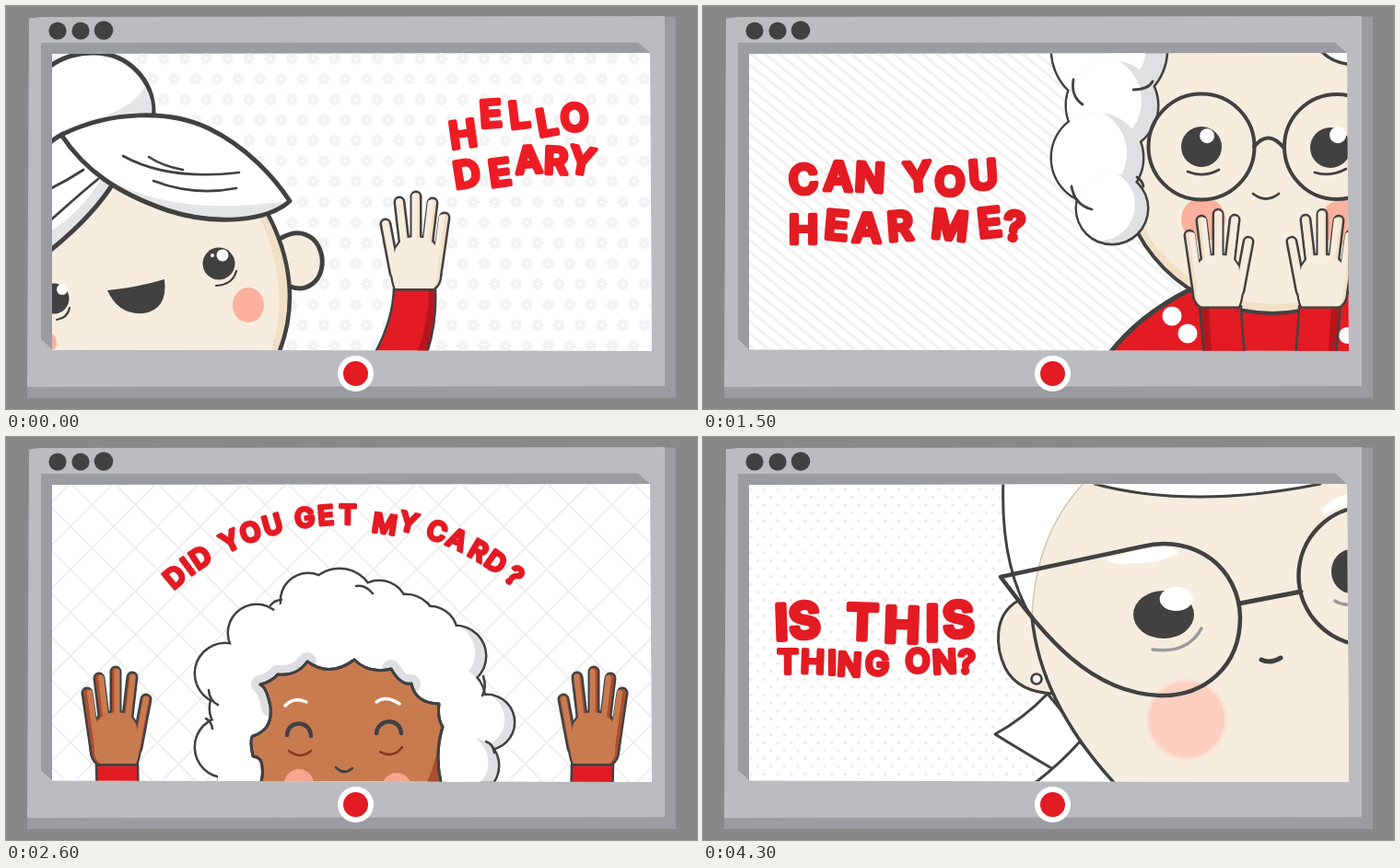
Animation of 750 by 438 pixels, one loop 4.4 s. Source, as an HTML page with a canvas:

```html
<!DOCTYPE html>
<html lang="en">
<head>
<meta charset="utf-8">
<title>Video call</title>
<style>
html, body { margin: 0; width: 100%; height: 100%; overflow: hidden; background: #888; }
canvas { display: block; width: 750px; height: 438px; }
</style>
</head>
<body>
<canvas id="stage" width="750" height="438"></canvas>
<script>
const ctx = document.getElementById('stage').getContext('2d');
const INK = '#414142', RED = '#e31b23', DEEP = '#b5161c', SKIN = '#f7eddf', SAND = '#f1e0c6';
const BROWN = '#c97b50', RUST = '#a94f30', BLUSH = '#fbb19d', GREY = '#e4e5e7';
const STEP = 100, SCENE = 1100, LOOP = 4400;
const SCREEN = new Path2D('M50 52L699 51L701 375L50 373.5Z');

function fill(d, color) {
  ctx.fillStyle = color;
  ctx.fill(new Path2D(d));
}

function line(d, width = 4, color = INK) {
  ctx.strokeStyle = color;
  ctx.lineWidth = width;
  ctx.stroke(new Path2D(d));
}

function shape(d, color, width) {
  fill(d, color);
  line(d, width);
}

function oval(x, y, rx, color, ry = rx) {
  ctx.fillStyle = color;
  ctx.beginPath();
  ctx.ellipse(x, y, rx, ry, 0, 0, Math.PI * 2);
  ctx.fill();
}

function ring(x, y, r, width = 4) {
  ctx.strokeStyle = INK;
  ctx.lineWidth = width;
  ctx.beginPath();
  ctx.arc(x, y, r, 0, Math.PI * 2);
  ctx.stroke();
}

function at(x, y, draw) {
  ctx.save();
  ctx.translate(x, y);
  draw();
  ctx.restore();
}

// spots: x, y, degrees per letter; the second pose shakes each letter a little
function letters(text, spots, size, color, shaken) {
  ctx.font = `600 ${size}px Inter, "Open Sans", sans-serif`;
  ctx.textAlign = 'center';
  ctx.fillStyle = ctx.strokeStyle = color;
  ctx.lineWidth = size * 0.11;
  [...text].forEach((ch, i) => {
    const [x, y, deg] = spots.slice(i * 3, i * 3 + 3);
    const shake = shaken ? Math.sin(i * 2.4 + 1) : 0;
    ctx.save();
    ctx.translate(x, y - shake);
    ctx.rotate((deg + shake * 2) * Math.PI / 180);
    ctx.fillText(ch, 0, size * 0.364);
    ctx.strokeText(ch, 0, size * 0.364);
    ctx.restore();
  });
}

const FINGERS = new Path2D('M-31 28L-22 90M-18 12L-12 62M0 5L0 62M18 11L12 62M33 35L23 88');
const PALM = new Path2D('M-25 62L-14 51L0 49L14 51L22 62L26 86Q25 98 22 105L-19 105Q-26 100 -26 90Z');

// origin is the tip of the middle finger
function hand(x, y, flip, skin, shade) {
  const layer = (color, grow) => {
    ctx.strokeStyle = ctx.fillStyle = color;
    ctx.lineWidth = 8 + grow;
    ctx.stroke(FINGERS);
    if (grow > 0) {
      ctx.lineWidth = grow;
      ctx.stroke(PALM);
    }
    ctx.fill(PALM);
  };
  at(x, y, () => {
    ctx.scale(flip, 1);
    layer(INK, 5);
    layer(shade, 0);
    ctx.translate(1.4, 0);
    ctx.scale(0.95, 1);
    layer(skin, -1.5);
  });
}

// union of circles with one outline; the first ones carry a shadow on the right
function cloud(balls, shaded) {
  balls.forEach(([x, y, r]) => oval(x, y, r + 1.5, INK));
  balls.forEach(([x, y, r], i) => {
    oval(x, y, r - 1, i < shaded ? '#dfe0e2' : '#fff');
    if (i >= shaded) return;
    ctx.save();
    ctx.beginPath();
    ctx.arc(x, y, r - 1, 0, Math.PI * 2);
    ctx.clip();
    oval(x - r * 0.36, y - r * 0.1, r, '#fff');
    ctx.restore();
  });
}

function eye(x, y, r, glintX, glintY, glint) {
  oval(x, y, r, INK);
  oval(glintX, glintY, glint, '#fff');
}

function flowers() {
  ctx.strokeStyle = '#f3f3f4';
  ctx.lineWidth = 3.6;
  for (let row = 0; row < 15; row++) {
    for (let x = 55 + row % 2 * 11.6; x < 705; x += 23.2) {
      const y = 57 + row * 22.3;
      ctx.beginPath();
      for (let a = 0; a < 8; a++) {
        const c = Math.cos(a * Math.PI / 4), s = Math.sin(a * Math.PI / 4);
        ctx.moveTo(x + c * 3, y + s * 3);
        ctx.lineTo(x + c * 5, y + s * 5);
      }
      ctx.stroke();
    }
  }
}

function slants(gap, slope, width, color) {
  ctx.strokeStyle = color;
  ctx.lineWidth = width;
  ctx.beginPath();
  for (let x = -400; x < 1150; x += gap) {
    ctx.moveTo(x, 50);
    ctx.lineTo(x + 330 / slope, 380);
  }
  ctx.stroke();
}

function helloScene(wave, odd, gx, gy) {
  flowers();

  // bun
  shape('M40 72Q62 51 95 51C132 51 161 80 160 118L130 160L40 160Z', '#fff', 5);
  fill('M151 87Q160 102 158 119L82 126Q135 116 151 87Z', GREY);

  // ear and face
  shape('M299 252Q318 241 333 253C350 269 346 304 320 307Q313 307 306 304', SKIN, 5);
  fill('M40 270L110 190L280 222C308 270 318 325 295 380L40 380Z', SKIN);
  fill('M274 226C296 275 306 330 285 380L295 380C318 325 308 270 283 224Z', SAND);
  line('M283 224C308 270 318 325 295 380', 4.5);

  // hair
  fill('M40 152L62 140L118 190Q94 230 40 272Z', '#fff');
  fill('M116 192L104 186Q82 226 40 250L40 270Q94 230 116 192Z', GREY);
  line('M118 190Q94 230 40 272', 5);
  line('M84 178Q66 190 45 200M100 188Q78 206 45 236', 2.8);
  const sweep = 'M60 140C115 113 178 113 220 133C261 153 291 186 308 212C285 233 230 240 175 222C120 203 85 178 60 140Z';
  fill(sweep, '#fff');
  fill('M306 212C285 232 230 239 175 221C135 207 108 192 88 174C148 217 220 224 306 212Z', GREY);
  line(sweep, 5);
  line('M45 151Q52 144 62 139', 5);
  line('M127 163Q176 190 253 181M155 164Q170 174 192 178M160 190Q204 207 250 198', 2.6);

  // features
  eye(231, 280, 17.5, 235 + gx, 270 + gy, 6.5);
  oval(224, 271, 2, '#fff');
  eye(52, 318, 16.5, 61 + gx, 307 + gy, 6);
  line('M228 304Q246 303 250 288M55 341Q67 339 69 328', 2.2);
  fill('M110 309Q142 306 172 297Q176 330 149 334Q122 336 110 309Z', INK);
  oval(263, 325, 17, BLUSH, 19);
  oval(48, 366, 7, BLUSH, 10);

  at(wave * -5.7, 0, () => {
    fill('M421 307Q420 342 399 380L456 380Q468 345 466 307Z', RED);
    fill('M459 308Q459 345 445 380L456 380Q468 345 466 307Z', DEEP);
    line('M421 307Q420 342 399 380M466 307Q468 345 456 380', 2.5);
    hand(445, 202, -1, SKIN, SAND);
  });

  const word = [496, 139, -8, 526, 117, -4, 557, 118, -7, 587, 126, -10, 617, 121, -5,
    500, 182, -9, 536, 181, -8, 567, 167 - odd * 2, -4, 597, 168, 2, 625, 168, 10];
  letters('HELLODEARY', word, 40, '#ee1c25', odd);
}

function hearScene(lift, odd, gx, gy) {
  slants(15.5, 0.82, 3.2, '#f2f2f3');

  // sweater and face
  shape('M438 382Q470 338 527 309L720 309L720 382Z', RED, 5);
  oval(618, 168, 168, INK);
  oval(618, 168, 164, SAND);
  oval(621, 160, 164, SKIN);
  oval(509, 337, 10.5, '#fff');
  oval(526, 356, 10.5, '#fff');
  oval(699, 358, 9, '#fff');
  shape('M668 45Q680 62 705 64L705 45Z', '#fff', 3.5);

  cloud([[441, 47, 63], [444, 108, 50], [428, 165, 50], [444, 220, 39]], 4);
  line('M402 80Q399 98 412 107M400 196Q403 216 422 221M467 91Q483 91 488 82M471 186Q477 190 478 196', 2.8);

  oval(543, 232, 24, BLUSH);
  oval(695, 235, 25, BLUSH);
  ring(541, 153, 57.5);
  ring(688, 153, 57);
  line('M598 153Q614 133 631 155');
  eye(541, 153, 22, 547 + gx, 142 + gy, 8);
  eye(681, 154, 22, 689 + gx, 141 + gy, 9);
  line('M526 180Q543 187 560 178M664 181Q682 186 698 177', 2.8);
  line('M597 204Q611 215 625 204', 2.8);

  const y = 237 - lift * 19;
  for (const [x, flip] of [[559, 1], [672, -1]]) {
    at(x, y, () => {
      ctx.scale(flip, 1);
      fill('M-20 105L25 105L30 170L-14 170Z', RED);
      fill('M-20 105L-10 105L-6 170L-14 170Z', DEEP);
      line('M-20 105L-14 170M25 105Q26 130 30 170', 2.5);
    });
    hand(x, y, flip, SKIN, SAND);
  }

  letters('CANYOUHEARME?', [109, 188, -5, 147, 185, 2, 181, 186, 3, 233, 185, -4, 268, 190, 0, 304, 183, -4,
    109, 242, 0, 145, 238, 5, 178, 241, 2, 214, 239, -4, 268, 238, 6, 311, 235, -6, 338, 239, 4], 43, RED, !odd);
}

function cardScene(bob, odd) {
  slants(47, 1, 1.8, '#eeeeef');
  slants(47, -1, 1.8, '#eeeeef');

  const drop = bob - 0.826;
  at(0, drop * 9.4, () => {
    cloud([[488, 238, 33], [522, 310, 30], [503, 357, 32],
      [328, 178, 30], [362, 181, 38], [405, 187, 31], [434, 204, 33], [460, 214, 30], [484, 285, 36],
      [272, 213, 31], [238, 257, 33], [250, 295, 29], [238, 337, 33], [265, 375, 34], [478, 330, 32], [480, 360, 38]], 3);
    fill('M235 240L300 180L450 195L492 260L515 310L495 390L230 390L230 280Z', '#fff');

    const face = 'M270 390Q282 372 277 353Q275 348 268 347Q264 328 268 325Q290 318 287 293Q283 272 276 269' +
      'Q288 266 295 258Q316 260 327 244Q352 262 378 242Q394 258 418 252Q428 270 440 268Q444 289 470 290Q468 306 474 315Q463 350 476 390Z';
    line('M287 294Q283 272 276 269Q288 266 295 258Q316 260 327 244M418 252Q428 270 440 268', 20, '#dcdee0');
    shape(face, BROWN, 3);
    fill('M473 317Q464 350 474 390L450 390Q468 355 473 317Z', RUST);
    line(face, 3);
    line('M380 162Q390 160 398 170M220 275Q221 287 230 291M224 317Q223 309 217 306M287 183Q292 177 299 177M518 260Q522 272 517 281M521 331Q529 334 530 343', 2.6);
    line('M303 292Q312 282 326 288M402 288Q412 280 427 290', 3.5, '#fff');
    line('M305 324C306 307 330 307 331 325M402 322C404 305 428 305 429 322', 4.5);
    line('M307 341Q320 351 331 341M406 342Q420 350 430 337', 2.6, '#8c3322');
    line('M358 359Q367 368 376 360', 2.6);
    oval(318, 377, 16, '#f6a68f');
    oval(424, 381, 16, '#f6a68f');
  });

  for (const [x, flip] of [[119, 1], [638, -1]]) {
    const hx = x - flip * drop * 3.3, hy = 250 + drop * 9.4;
    at(hx, hy, () => {
      ctx.scale(flip, 1);
      shape('M-21 106L24 106L25 150L-20 150Z', RED, 2.5);
    });
    hand(hx, hy, flip, BROWN, RUST);
  }

  const spots = [183, 197, 211, 243, 265, 289, 324, 347, 371, 411, 437, 468, 490, 513, 532, 552].flatMap((x, i) => {
    const a = Math.asin((x - 368) / 287);
    return [x, 371 - 287 * Math.cos(a) + (i === 9 ? 7 : 0), a * 180 / Math.PI];
  });
  letters('DIDYOUGETMYCARD?', spots, 29, RED, odd);
}

function thingScene(odd, gx, gy) {
  for (let row = 0; row < 38; row++) {
    for (let x = 52 + row % 2 * 7.3; x < 400; x += 14.6) oval(x, 57 + row * 8.6, 1.8, '#ececee');
  }

  // collar, ear, hair and face
  shape('M374 279Q348 306 317 323Q346 341 380 361L415 330Z', '#fff', 3);
  shape('M409 331Q386 357 355 380L450 380Z', '#fff', 3);
  shape('M342 178C314 194 318 230 328 251Q342 278 382 279L370 200Z', SKIN, 3);
  fill('M326 45Q322 140 357 197L440 140L430 45Z', '#fff');
  line('M326 45Q322 140 357 197', 3);
  fill('M418 45C374 90 360 140 357 195Q366 290 450 380L710 380L710 45Z', SKIN);
  line('M418 45C374 90 360 140 357 195', 1.5, '#d3c5b2');
  line('M357 195Q366 290 450 380', 3.5);
  fill('M412 45L425 52Q530 78 670 51L670 45Z', '#fff');
  line('M425 51Q530 79 670 51', 3);
  oval(362, 263, 5, '#fff');
  ring(362, 263, 5.5, 2.6);

  oval(525, 307, 44, '#fae0d3');
  oval(525, 307, 41, '#fccfc1');

  // glasses
  fill('M438 132L490 119Q520 120 515 127Q497 137 470 137Q440 140 438 132Z', '#fff');
  fill('M671 79Q684 65 705 61L705 76Q688 75 676 84Z', '#fff');
  line('M323 152L477 119C535 105 582 143 583 196C583 250 544 282 496 281C420 278 372 218 323 152Z', 4.5);
  line('M323 152L357 195', 3.5);
  line('M582 181L649 168', 5);
  ring(722, 151, 75.5, 4.5);

  oval(500, 193, 33, INK, 26);
  oval(513 + gx, 177 + gy, 18, '#fff', 13);
  line('M488 231Q526 236 541 208', 3.5, '#9a9a9c');
  oval(704, 146, 22, INK, 24);
  line('M686 178Q693 183 704 182', 3.5, '#9a9a9c');
  line('M606 242Q615 247 627 240', 5);

  letters('ISTHIS', [85, 201, -2, 110, 199, -4, 173, 201, 2, 216, 204, 2, 249, 202, 0, 277, 198, -4], 52, RED, !odd);
  letters('THINGON?', [92, 244, 0, 119, 244, 2, 140, 245, 0, 159, 247, 3, 189, 246, 0, 233, 243, 0,
    262, 244, -3, 286, 244, 3], 35, RED, !odd);
}

function device() {
  ctx.fillStyle = '#888';
  ctx.fillRect(0, 0, 750, 438);
  fill('M26 13L727 11.5L727 426L23 426Z', '#9b9ca1');
  fill('M25 13.5L38 12L715 11L715 413L23 414Z', '#bbbcc0');
  fill('M38 40L686 39.5L700 52L51 52L51 374L38 362Z', '#9b9ca1');
  [56, 81, 106].forEach((x, i) => oval(x, i < 2 ? 27 : 26.5, i < 2 ? 9.6 : 10.3, INK));
  oval(379.5, 399.5, 19.5, '#fff');
  oval(379.5, 399.5, 13.5, RED);
}

function draw() {
  const frame = Math.floor(performance.now() % LOOP / STEP);
  const local = frame * STEP % SCENE;
  const swing = (1 - Math.cos(local / SCENE * Math.PI * 2)) / 2;
  const odd = frame % 2;
  const gx = Math.sin(frame * 2.1) * 0.9, gy = Math.cos(frame * 2.7) * 0.9;

  ctx.lineCap = ctx.lineJoin = 'round';
  device();
  ctx.save();
  ctx.clip(SCREEN);
  ctx.fillStyle = '#fff';
  ctx.fillRect(48, 48, 656, 330);
  [
    () => helloScene(swing, odd, gx, gy),
    () => hearScene(swing, odd, gx, gy),
    () => cardScene(swing, odd),
    () => thingScene(odd, gx, gy)
  ][Math.floor(frame * STEP / SCENE)]();
  ctx.restore();
  requestAnimationFrame(draw);
}
draw();
</script>
</body>
</html>
```
